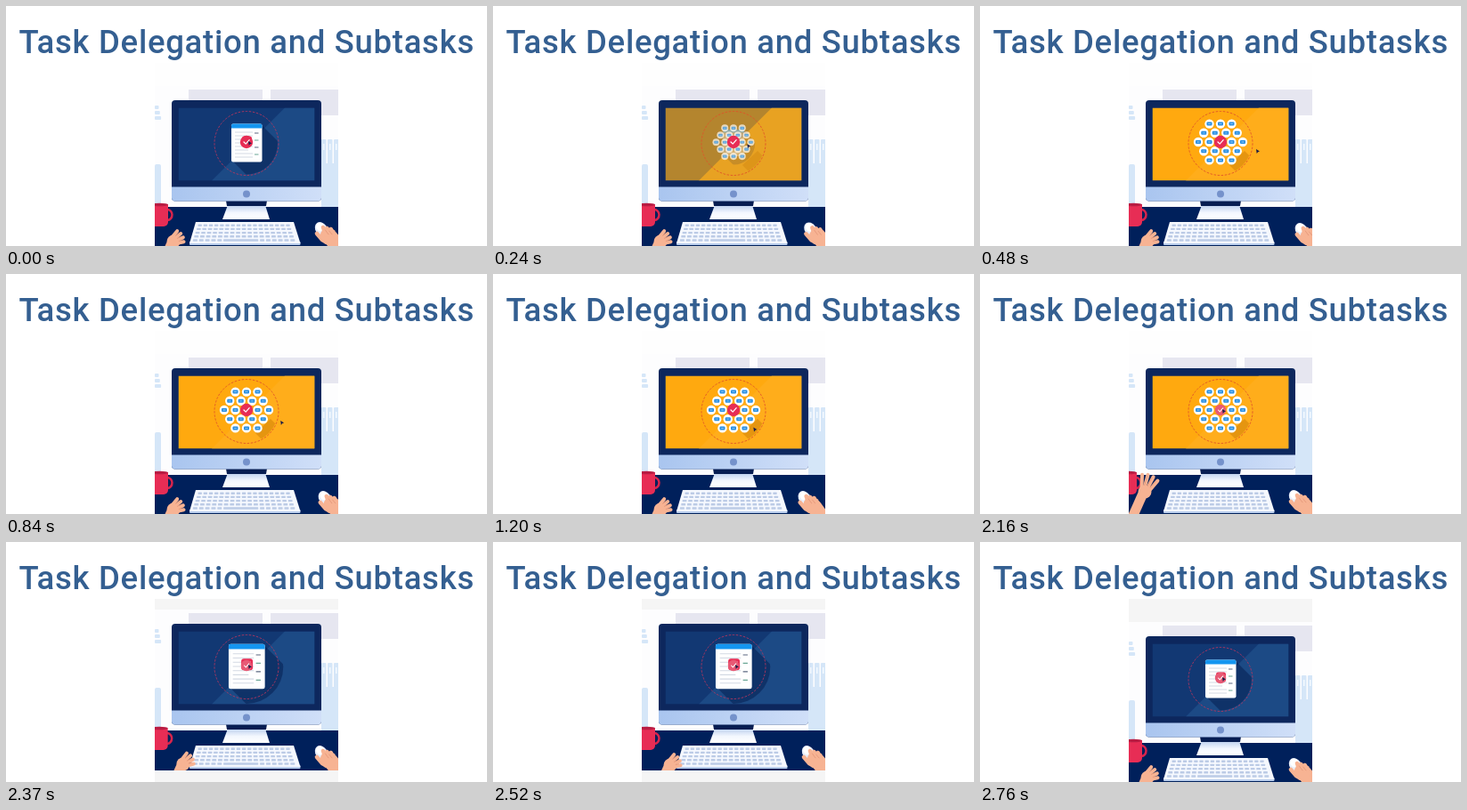
These frames come from a looping animation (540 by 270 pixels, 2.79 s). An HTML page with a canvas:

```html
<!DOCTYPE html>
<html lang="en">
<head>
<meta charset="utf-8">
<title>Task Delegation and Subtasks</title>
<style>
html,body{margin:0;width:100%;height:100%;overflow:hidden;background:#fff}
canvas{display:block;width:540px;height:270px}
</style>
</head>
<body>
<canvas id="c" width="540" height="270"></canvas>
<script>
const g = document.getElementById('c').getContext('2d');
const LOOP = 2790, STEP = 30;
const NAVY = '#00205b', SKIN = '#f7b393', CREASE = '#dc8c6f', RED = '#e72d55';
const VIEW = { x: 193.5, y: 114.5, w: 153, h: 82 };

const clamp = v => Math.max(0, Math.min(1, v));
const ease = v => v * v * (3 - 2 * v);
const ramp = (t, a, b) => ease(clamp((t - a) / (b - a)));
const pulse = (t, a, b, c, d) => ramp(t, a, b) - ramp(t, c, d);

function box(x, y, w, h, fill, r = 0) {
  g.fillStyle = fill;
  g.beginPath();
  g.roundRect(x, y, w, h, r);
  g.fill();
}
function disc(x, y, r, fill, ry = r, turn = 0) {
  g.fillStyle = fill;
  g.beginPath();
  g.ellipse(x, y, r, ry, turn, 0, 7);
  g.fill();
}
function poly(fill, ...p) {
  g.fillStyle = fill;
  g.beginPath();
  for (let i = 0; i < p.length; i += 2) g.lineTo(p[i], p[i + 1]);
  g.fill();
}
function line(color, width, ...p) {
  g.strokeStyle = color;
  g.lineWidth = width;
  g.lineCap = g.lineJoin = 'round';
  g.beginPath();
  for (let i = 0; i < p.length; i += 2) g.lineTo(p[i], p[i + 1]);
  g.stroke();
}
function at(x, y, scale, alpha, draw) {
  g.save();
  g.translate(x, y);
  g.scale(scale, scale);
  g.globalAlpha = alpha;
  draw();
  g.restore();
}

function room() {
  const pale = '#d5e6f8';
  box(167, 90, 206, 181, '#fdfdfe');
  box(205, 94, 83, 14, '#e6e6f0');
  box(297, 94, 76, 29, '#e6e6f0');
  for (let i = 0; i < 3; i++) box(167, 112 + i * 6, 4.5 + i * 1.3, 4, pale, 1);
  box(167, 178, 7, 48, pale, 2);
  box(354, 177, 19, 49, pale);
  for (let x = 354; x < 373; x += 7) {
    box(x, 150, 5.5, 28, pale, 1);
    box(x + 2, 155, 1.5, 7, '#f4f9ff');
  }
  box(167, 226, 206, 45, NAVY);
}

function mug(x) {
  g.strokeStyle = '#d8244c';
  g.lineWidth = 2.5;
  g.beginPath();
  g.ellipse(x + 14, 235, 5.5, 6, 0, -1.6, 1.6);
  g.stroke();
  box(x - 4, 223, 19, 25, RED, [1, 1, 5, 5]);
  disc(x + 5.5, 223.5, 9.5, '#b91c43', 1.8);
}

function keyboard() {
  const rows = 5, keys = 17;
  box(206, 265, 124.5, 4, '#b9cdec', 1);
  poly('#f5f8fe', 213, 243, 323, 243, 330.5, 267, 206, 267);
  for (let r = 0; r < rows; r++) {
    const y = 245.5 + r * 4.2, left = 215.5 - r * 1.4, pitch = (105 + r * 2.8) / keys;
    for (let i = 0; i < keys; i++) {
      const wide = r === rows - 1 && i === 5 ? 6 : 1;
      box(left + i * pitch, y, pitch * wide - 1.8, 2.4, '#bccbe6', .6);
      i += wide - 1;
    }
  }
}

function check(s) {
  line('#fff', 1.2 * s, -3 * s, 0, -.8 * s, 2.2 * s, 3.2 * s, -2.4 * s);
}

// Long diagonal shadow behind an edge, held inside the ring.
function shadow(fill, x0, y0, x1, y1) {
  const far = 50;
  g.save();
  g.beginPath();
  g.arc(0, .5, 35, 0, 7);
  g.clip();
  poly(fill, x0, y0, x0 + far, y0 + far, x1 + far, y1 + far, x1, y1);
  g.restore();
}

function page() {
  shadow('rgba(0,20,70,.45)', 17, -20, -15, 21);
  box(-17, -21.5, 34.5, 43, '#fff', 2);
  box(-17, -21.5, 34.5, 5, '#1496f0', [2, 2, 0, 0]);
  for (let i = 0; i < 8; i++) {
    const y = -12.5 + i * 4;
    box(-13, y, i % 3 === 2 ? 15 : 20, .9, '#d3d9e3');
    if (i % 2 === 0) box(9, y + 1, 4.5, 1, i % 4 ? '#6aa695' : '#5a6780');
  }
  box(-5, -7.5, 11, 11, RED, 2.5);
  at(.5, -2, 1, 1, () => check(.9));
}

function nodes(k, press) {
  shadow('rgba(190,112,0,.4)', 27, 9, 10, 25);
  for (let r = -2; r <= 2; r++) {
    const n = 5 - Math.abs(r);
    for (let i = 0; i < n; i++) {
      const x = (i - (n - 1) / 2) * 12.5 * k, y = (r * 10.2 - 1) * k;
      if (!r && i === 2) continue;
      disc(x, y, 5.2 * k, '#fff');
      box(x - 3 * k, y - 2 * k, 6 * k, 4 * k, '#238ce2', 1);
      box(x - 1.6 * k, y - .4, 3.2 * k, .8, '#a6d5fa');
    }
  }
  const s = 1 - .14 * press;
  at(0, -1, s, 1, () => {
    disc(0, 0, 7.2, press > .5 ? '#e75a75' : RED);
    check(1);
  });
}

function backdrop(base, sheen, alpha) {
  const { x, y, w, h } = VIEW;
  g.globalAlpha = alpha;
  box(x, y, w, h, base);
  poly(sheen, 313, y, x + w, y, x + w, y + h, 231, y + h);
  g.globalAlpha = 1;
}

function screen(s) {
  const { open, lift, press, cursor: [x, y] } = s;
  g.save();
  g.beginPath();
  g.rect(VIEW.x, VIEW.y, VIEW.w, VIEW.h);
  g.clip();
  backdrop('#123873', '#1c4a85', 1);
  backdrop('#ffa90f', '#ffad1b', open);
  at(270, 154, (1 + .18 * lift) * (1 - .45 * open), 1 - open, page);
  at(270, 154, 1, open, () => nodes(.3 + .7 * open, press));
  g.strokeStyle = open > .5 ? '#e0532a' : '#b5365f';
  g.lineWidth = .9;
  g.lineCap = 'butt';
  g.setLineDash([2.5, 1.6]);
  g.beginPath();
  g.arc(270, 154.5, 36, 0, 7);
  g.stroke();
  g.setLineDash([]);
  poly('#1b1d48', x, y, x + 4, y + 2.6, x + 2.1, y + 3.2, x + .7, y + 5);
  g.restore();
}

function monitor(s) {
  const foot = g.createLinearGradient(0, 225, 0, 240);
  foot.addColorStop(0, '#c3d4f0');
  foot.addColorStop(.5, '#f3f7fe');
  foot.addColorStop(1, '#fff');
  poly(foot, 249, 224, 291, 224, 296, 240, 243, 240);
  poly('#071d52', 247, 219, 293, 219, 292, 225, 248, 225);
  box(186, 106, 168, 113.5, '#0d275d', 4);
  const chin = g.createLinearGradient(186, 0, 354, 0);
  chin.addColorStop(0, '#a9c5ef');
  chin.addColorStop(1, '#d0dff8');
  box(186, 203.5, 168, 16, chin, [0, 0, 4, 4]);
  disc(270, 211.5, 4, '#7592cb');
  screen(s);
}

function leftHand(x, y, reach) {
  const aim = -.55 - .65 * reach, size = 12 + 7 * reach;
  at(x, y, 1, 1, () => {
    line(SKIN, 11, -15, 32, -3, 5);
    disc(0, 1, 7.5, SKIN);
    for (let i = 0; i < 4; i++) {
      const a = aim + (i - 1.5) * .22, c = Math.cos(a), d = Math.sin(a);
      const len = size - Math.abs(i - 1.5) * 1.5, off = (i - 1.5) * 2.6;
      const px = -Math.sin(aim) * off, py = Math.cos(aim) * off;
      line(SKIN, 4, px, py, px + c * len, py + d * len);
      if (i) line(CREASE, .6, px + c * 4, py + d * 4 - 2, px + c * len * .8, py + d * len * .8 - 2);
    }
  });
}

function rightHand(x, y) {
  at(x, y, 1, 1, () => {
    disc(-3, 4, 6.5, '#e9effb', 8.5, -.6);
    disc(-4, 1.5, 4.5, '#fff', 5, -.6);
    line(SKIN, 17, 8, 14, 24, 36);
    disc(5, 12, 9.5, SKIN);
    line(SKIN, 4.6, -2, 16, -8, 9);
    for (let i = 0; i < 3; i++) {
      line(SKIN, 4.6, 2 + i * 4, 10, -1 + i * 4.4, 2 + i);
      if (i) line(CREASE, .6, 1 + i * 4, 10, -3 + i * 4.4, 4 + i);
    }
  });
}

// All moving values at time t.
function pose(t) {
  const out = pulse(t, 100, 450, 700, 1750);
  const sag = Math.sin(Math.PI * clamp((t - 700) / 1450));
  const drop = pulse(t, 100, 450, 1500, 2150);
  const cx = 272 + 38 * out;
  return {
    open: pulse(t, 90, 330, 2190, 2370),
    press: ramp(t, 2070, 2160),
    lift: pulse(t, 2190, 2370, 2550, 2700),
    band: ramp(t, 2190, 2280),
    reach: pulse(t, 1500, 2160, 2190, 2400),
    cursor: [cx, 152 + 9 * drop + 13 * sag],
    mouse: [357 + .18 * (cx - 272) - 9 * sag, 247 + drop]
  };
}

function scene(s) {
  g.save();
  g.beginPath();
  g.rect(167, 64, 206, 206);
  g.clip();
  box(167, 64, 206, 206, '#fefefe');
  g.globalAlpha = s.band;
  box(167, 64, 206, 206, '#f5f5f5');
  g.globalAlpha = 1;
  g.translate(0, -14 * s.lift);
  g.beginPath();
  g.rect(167, 90, 206, 181);
  g.clip();
  room();
  monitor(s);
  mug(167 - 6 * s.reach);
  keyboard();
  leftHand(188 - 3 * s.reach + 11 * s.lift, 264 - 20 * s.reach, s.reach);
  rightHand(...s.mouse);
  g.restore();
}

function draw(now) {
  const t = Math.floor((now % LOOP) / STEP) * STEP;
  g.fillStyle = '#fff';
  g.fillRect(0, 0, 540, 270);
  g.fillStyle = '#345f91';
  g.font = '500 36.5px Roboto, sans-serif';
  g.letterSpacing = '.7px';
  g.textAlign = 'center';
  g.fillText('Task Delegation and Subtasks', 270.3, 52.7);
  scene(pose(t));
}

const start = performance.now();
function tick() {
  draw(performance.now() - start);
  requestAnimationFrame(tick);
}
tick();
</script>
</body>
</html>
```
